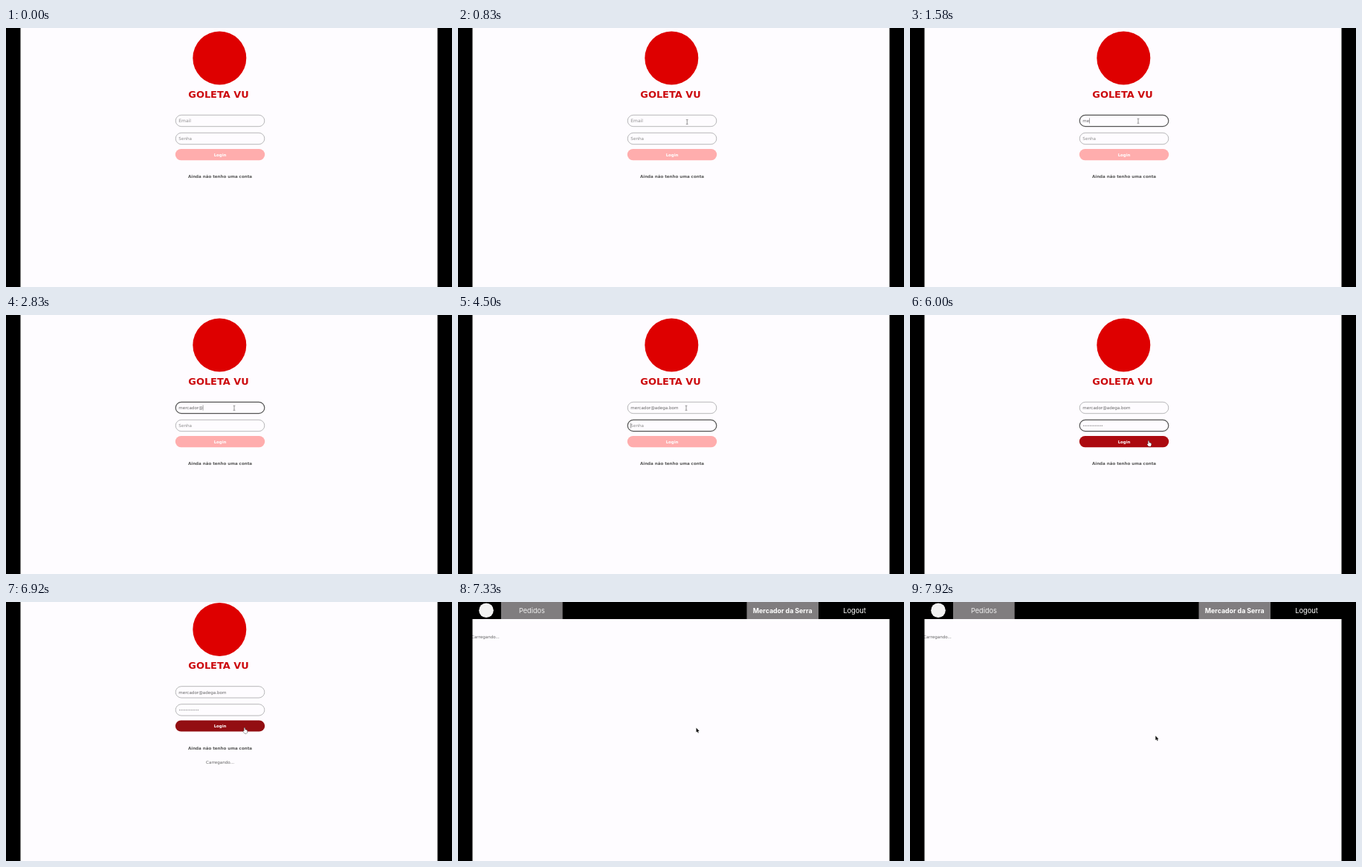
An HTML page with a canvas for the animation above (8 s loop, 600 by 349 pixels).

```html
<!DOCTYPE html>
<html lang="pt">
<head>
<meta charset="utf-8">
<title>Login</title>
<style>
  html, body { margin: 0; width: 100%; height: 100%; overflow: hidden; background: #000; }
  canvas { display: block; width: 600px; height: 349px; }
</style>
</head>
<body>
<canvas id="stage" width="600" height="349"></canvas>
<script>
const ctx = document.getElementById('stage').getContext('2d');
const LOOP = 8000, FPS = 12;
const EMAIL = 'mercador@adega.bom';
const EMAIL_KEYS = [1420, 1500, 1830, 1920, 2000, 2080, 2250, 2420, 2750,
                    3000, 3080, 3170, 3250, 3500, 3750, 3920, 4170, 4330];
const PASSWORD_LENGTH = 12;
const T = { enter: 170, arrive: 920, email: 1000, password: 4500, secret: 5000, secretEnd: 5330,
            leave: 5500, button: 5920, click: 6080, loading: 6170, orders: 7330, drift: 7670, end: 7920 };
const PAPER = '#fefcff', RED = '#de0000', INK = '#666', HINT = '#8f8f8f';

const clamp = v => Math.max(0, Math.min(1, v));
const progress = (t, a, b) => clamp((t - a) / (b - a));
const mix = (a, b, p) => a + (b - a) * p;
const smooth = p => p * p * (3 - 2 * p);

function text(str, x, y, size, color, { weight = 400, align = 'left', family = 'DejaVu Sans' } = {}) {
  ctx.font = `${weight} ${size}px "${family}", sans-serif`;
  ctx.textAlign = align;
  ctx.fillStyle = color;
  ctx.fillText(str, x, y);
  return ctx.measureText(str).width;
}

function disc(x, y, r, color) {
  ctx.fillStyle = color;
  ctx.beginPath();
  ctx.arc(x, y, r, 0, 7);
  ctx.fill();
}

function pill(x, y, w, h) {
  ctx.beginPath();
  ctx.roundRect(x, y, w, h, h / 2);
}

function field(y, focused) {
  pill(228.2, y, 119.6, 15.4);
  ctx.strokeStyle = focused ? '#555' : '#b4b4b6';
  ctx.lineWidth = focused ? 1.2 : 0.95;
  ctx.stroke();
}

function caret(x, y, t, since) {
  if ((t - since) % 1000 >= 500) return;
  ctx.fillStyle = '#666';
  ctx.fillRect(x + 0.3, y - 3.6, 0.6, 7.2);
}

function emailField(t) {
  const focused = t >= T.email && t < T.password;
  const typed = EMAIL_KEYS.filter(k => k <= t).length;
  let width = 0;
  field(117.3, focused);
  if (typed) width = text(EMAIL.slice(0, typed), 232.3, 127.1, 5.6, INK);
  else text('Email', 232.3, 127.1, 6, HINT);
  if (focused) caret(232 + width, 125, t, typed ? EMAIL_KEYS[typed - 1] : T.email);
}

function passwordField(t) {
  const focused = t >= T.password && t < T.click;
  const typed = t < T.secret ? 0 : Math.ceil(mix(2, PASSWORD_LENGTH, progress(t, T.secret, T.secretEnd)));
  field(141.3, focused);
  if (!typed) text('Senha', 232.3, 151.1, 5.7, HINT);
  for (let i = 0; i < typed; i++) disc(233.6 + i * 2.25, 149.2, 0.65, '#777');
  if (focused) caret(232 + typed * 2.25, 149, t, typed ? T.secretEnd : T.password);
  return typed;
}

function loginButton(t, ready) {
  let color = ready ? '#d80508' : '#ffadad';
  if (t >= T.button - 80) {
    const p = progress(t, T.click, T.click + 250);
    color = `rgb(${mix(172, 147, p)}, ${mix(10, 14, p)}, ${mix(15, 18, p)})`;
  }
  pill(227.8, 163, 120.4, 15.2);
  ctx.fillStyle = color;
  ctx.fill();
  text('Login', 288, 172.7, 5.4, '#fff', { weight: 700, align: 'center' });
}

function loginPage(t) {
  ctx.save();
  if (t >= T.loading) ctx.translate(0, -3.6);
  disc(287.3, 40.5, 36, RED);
  text('GOLETA VU', 286, 94, 12.9, '#cc0a0e', { weight: 700, align: 'center' });
  emailField(t);
  const typed = passwordField(t);
  loginButton(t, typed >= 6);
  text('Ainda não tenho uma conta', 288, 202.3, 5.55, '#5a5a5a', { weight: 700, align: 'center' });
  if (t >= T.loading) text('Carregando...', 288, 221.8, 5.6, INK, { align: 'center' });
  ctx.restore();
}

function ordersPage() {
  text('Carregando...', 18, 49, 5.6, INK);
  ctx.fillStyle = '#000';
  ctx.fillRect(0, 0, 600, 23);
  ctx.fillStyle = '#807d7f';
  ctx.fillRect(58, 0, 82.7, 23);
  ctx.fillRect(388.5, 0, 96.5, 23);
  disc(38, 11.3, 9.8, '#f2f2f2');
  const label = { align: 'center', family: 'Inter' };
  text('Pedidos', 99.4, 14.9, 9.2, '#eee', label);
  text('Mercador da Serra', 436.7, 14.9, 8.8, '#fff', { ...label, weight: 700 });
  text('Logout', 533.5, 14.9, 9.3, '#fff', label);
}

function polygon(x, y, points, fill, edge) {
  ctx.beginPath();
  points.forEach(([dx, dy]) => ctx.lineTo(x + dx, y + dy));
  ctx.closePath();
  ctx.lineWidth = 0.8;
  ctx.lineJoin = 'round';
  ctx.strokeStyle = edge;
  ctx.stroke();
  ctx.fillStyle = fill;
  ctx.fill();
}

const pointers = {
  arrow(x, y) {
    polygon(x, y, [[0, 0], [0, 6], [1.4, 4.8], [2.4, 7], [3.3, 6.6], [2.4, 4.5], [4.2, 4.4]], '#111', '#fff');
  },
  beam(x, y) {
    ctx.fillStyle = '#777';
    ctx.fillRect(x - 0.4, y - 3, 0.8, 6);
    ctx.fillRect(x - 1.4, y - 3.4, 2.8, 0.7);
    ctx.fillRect(x - 1.4, y + 2.7, 2.8, 0.7);
  },
  hand(x, y) {
    polygon(x, y, [[-1.3, -3.4], [-0.3, -3.4], [0, -0.9], [2.7, -0.3], [2.9, 2], [2, 4],
                   [-0.6, 4], [-2.6, 1.4], [-2.2, 0.6], [-1.3, 1.2]], '#fff', '#222');
  }
};

function pointer(t) {
  if (t < T.enter) return;
  let x, y;
  if (t < T.leave) {
    const p = 1 - (1 - progress(t, T.enter, T.arrive)) ** 2;
    x = mix(405, 307, p);
    y = mix(254, 125.2, p);
  } else if (t < T.orders) {
    const p = smooth(progress(t, T.leave, T.button));
    x = mix(307, 321.7, p);
    y = mix(125.2, 173, p);
  } else {
    const p = smooth(progress(t, T.drift, T.end));
    x = mix(320.5, 330.3, p);
    y = mix(169.6, 180.3, p);
  }
  const inside = (top, bottom) => t < T.orders && x > 228 && x < 348 && y > top && y < bottom;
  const shape = inside(117, 133) || inside(141, 157) ? 'beam' : inside(163, 178) ? 'hand' : 'arrow';
  pointers[shape](x, y);
}

function draw(t) {
  ctx.fillStyle = PAPER;
  ctx.fillRect(0, 0, 600, 349);
  if (t < T.orders) loginPage(t); else ordersPage();
  ctx.fillStyle = '#000';
  ctx.fillRect(0, 0, 19.5, 349);
  ctx.fillRect(580.5, 0, 19.5, 349);
  pointer(t);
}

function tick() {
  const time = performance.now() % LOOP;
  const step = Math.floor((time + 4) * FPS / 1000) % (LOOP * FPS / 1000);
  draw(step * 1000 / FPS + 5);
  requestAnimationFrame(tick);
}
tick();
</script>
</body>
</html>
```
